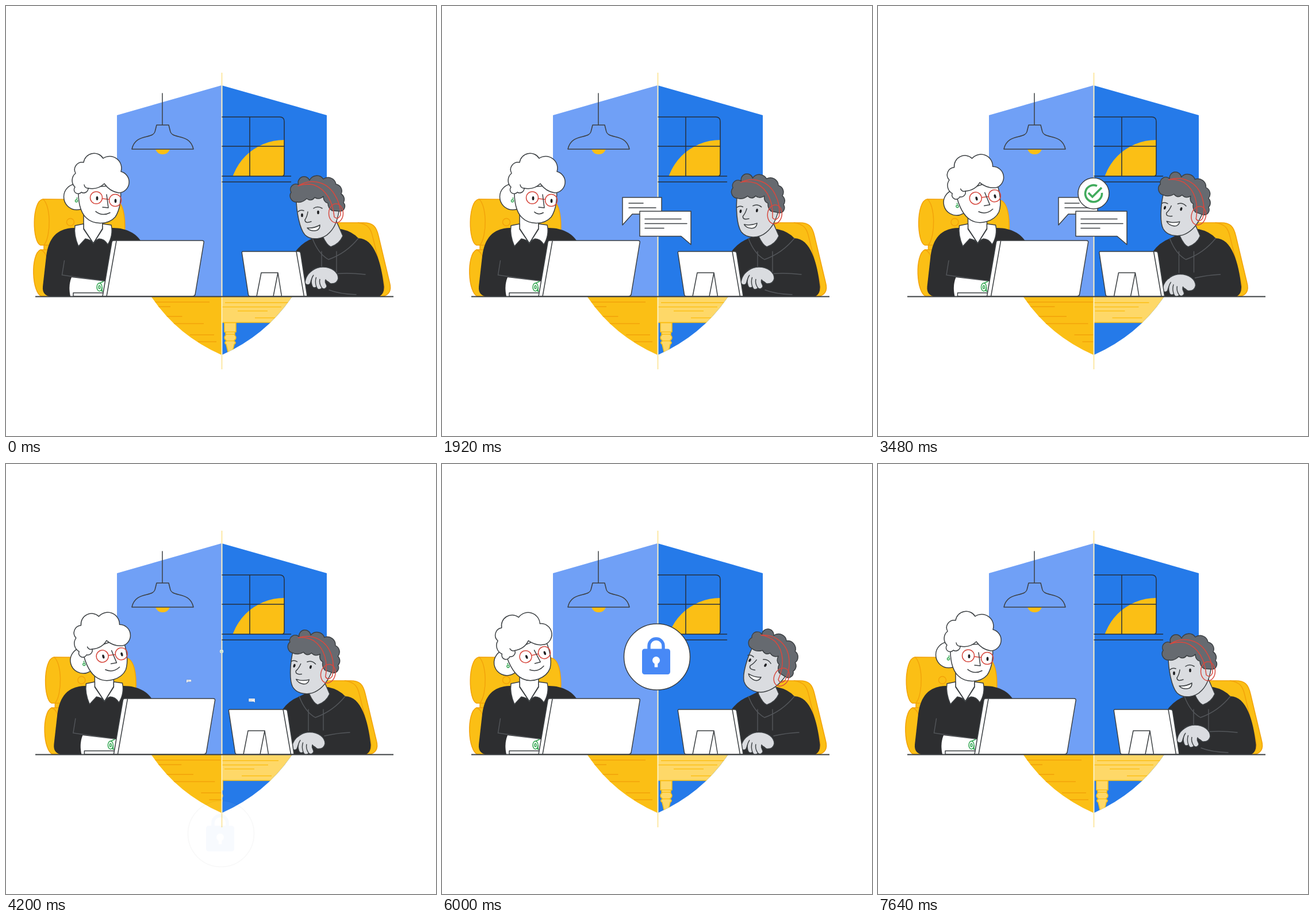
Recreate the animation shown at these times as an HTML page. Size 748 by 748 pixels, loop 7680 ms.

```html
<!DOCTYPE html>
<html lang="en">
<head>
<meta charset="utf-8">
<title>Working together</title>
<style>
html, body { margin: 0; width: 100%; height: 100%; overflow: hidden; background: #fff; }
svg { display: block; width: 100%; height: 100%; }
.ink { stroke: #3c4043; stroke-width: 1.5; stroke-linejoin: round; stroke-linecap: round; fill: none; }
.white { fill: #fff; }
.skin { fill: #dadce0; }
.hair { fill: #666a70; }
.black { fill: #2d2e30; }
.seam { stroke: #54575b; stroke-width: 1.4; fill: none; stroke-linecap: round; }
.amber { fill: #fbbf15; stroke: #f2a20a; stroke-width: 1.5; }
.grain { stroke: #f2a20a; stroke-width: 1.4; fill: none; }
.pale { fill: #fed868; stroke: #fbbf15; stroke-width: 1.5; }
.red { stroke: #d6493f; stroke-width: 1.5; fill: none; stroke-linejoin: round; }
.green { stroke: #34a853; stroke-width: 1.5; fill: none; }
.dot { fill: #202124; }
</style>
</head>
<body>
<svg viewBox="0 0 748 748">
  <defs>
    <clipPath id="leftBase"><path d="M253 506H375V607Q298 573 253 506Z"/></clipPath>
    <clipPath id="rightBase"><path d="M497.500 506H375.500V607Q452 573 497.500 506Z"/></clipPath>
    <clipPath id="pane"><path d="M376 193H476Q484 193 484 201V292Q484 296 480 296H376Z"/></clipPath>
  </defs>

  <!-- shield -->
  <path fill="#70a0f6" d="M193 190L375 138V506H193Z"/>
  <path fill="#257ae9" d="M375 138L558 190V506H375Z"/>
  <g clip-path="url(#leftBase)">
    <path fill="#fbbf15" d="M240 500H380V610H240Z"/>
    <path id="leftGrain" class="grain" d="M200 515H354M200 523H286M200 540H306.500M200 552.500H344M320 572H362M334 584H366"/>
  </g>
  <g clip-path="url(#rightBase)">
    <path fill="#257ae9" d="M370 500H500V610H370Z"/>
    <path fill="#fed868" d="M370 500H500V550.500H370Z"/>
    <path stroke="#fbbf15" stroke-width="1.500" d="M370 550.500H500"/>
    <g id="rightGrain">
      <path fill="none" stroke="#fbbf15" stroke-width="1.500" d="M381 516H497M376 523.500H479M403 530.500H455M433 542.500H485"/>
      <path class="pale" d="M380 551H400V567H380ZM382 567H398V571H382ZM384 571H396Q404 577 396 582.500H384Q376 577 384 571ZM384 582.500H396Q402 585.500 397 588.500L394 601V612H386V601L383 588.500Q378 585.500 384 582.500Z"/>
    </g>
  </g>
  <path stroke="#fbe391" stroke-width="1.600" d="M375.500 116V632"/>
  <path stroke="#fdf3cc" stroke-width="1.600" d="M375.500 138V607"/>

  <!-- lamp and window -->
  <path fill="#fbbf15" d="M260 249H285Q282 258 272.500 258T260 249Z"/>
  <path class="ink" d="M272 152V207M262 207H283L285.500 217C288 233 320 220 326 249H219C225 220 257 233 259.500 217Z"/>
  <circle clip-path="url(#pane)" cx="484" cy="328" r="95" fill="#fbbf15"/>
  <path class="ink" style="stroke:#26313f" d="M376 193H476Q484 193 484 201V291Q484 296 480 296H376M424 193V296M376 244H484M376 296H495.500M376 306H495.500"/>

  <g id="left">
    <path class="amber" d="M66 412H100V428H66Z"/>
    <path class="amber" d="M64 336L188 337C204 338 208 366 206.500 395V416H60C46 412 44 340 64 336Z"/>
    <path class="grain" d="M64 336C78 345 79 400 66 416"/>
    <circle class="grain" cx="112" cy="376" r="6.500"/>
    <path class="amber" d="M60 424H115V505H62C45 500 42 432 60 424Z"/>
    <path class="grain" d="M60 424Q71 428 73 448"/>
    <path class="black" d="M64 488L70 435C74 404 88 387 118 386H186C211 386 227 397 234 408V506H84C69 506 63 500 64 488Z"/>
    <path class="seam" d="M101.500 443L97.500 468L173 479"/>
    <path class="white" d="M175 479.500L114 472C109 484 110 496 112 505H175Z"/>
    <g id="watch" class="green">
      <ellipse cx="162.500" cy="489" rx="4.500" ry="7"/>
      <ellipse cx="162.500" cy="489" rx="1.500" ry="2.800"/>
      <path d="M163 482L170 479M165 495L170 497M167 489V497"/>
    </g>
    <path class="ink white" d="M117 499H176V505H117Z"/>
    <path class="ink white" d="M135 345V387L152 413L168 387V345Z"/>
    <path class="ink white" d="M135 379L120 382C118 396 122 409 126 418L138 405Q147 406 152 413L135 388Z"/>
    <path class="ink white" d="M168 379L183 381C186 393 183 406 177 415Q171 405 162 405Q156 407 152 413L168 388Z"/>
    <g id="womanHead">
      <circle class="ink white" cx="123" cy="332" r="22.500"/>
      <path class="ink white" d="M126 316C125 340 129 358 139 368C152 381 178 381 190 367C198 355 201 335 199 312Z"/>
      <path class="ink white" d="M121 291A13 13 0 0 1 135 272A18.500 18.500 0 0 1 169 265A20.500 20.500 0 0 1 200 288A18.800 18.800 0 0 1 196 325Q181 323 171 309Q160 320 143 317A8 8 0 0 1 131 324A7 7 0 0 1 120 315A16 16 0 0 1 121 291Z"/>
      <path class="ink" d="M143 317Q137 317 136 311"/>
      <circle class="green" cx="122.500" cy="339" r="2"/>
      <path class="green" d="M123.500 333V336"/>
      <ellipse class="dot" cx="158.500" cy="334.500" rx="1.900" ry="3.500"/>
      <ellipse class="dot" cx="190.500" cy="339" rx="1.900" ry="3.500"/>
      <g class="red">
        <circle cx="157" cy="333.500" r="10.500"/><circle cx="190" cy="338" r="10.500"/>
        <path d="M167.500 335L179.500 336.500"/>
      </g>
      <path class="ink" d="M175 328L178 351L168 350"/>
      <path id="smile" class="ink"/>
    </g>
    <path class="ink white" d="M187 408H341Q345 408 344 412L329 502Q328 505 324.500 505H168L184 411Q184.500 408 187 408Z"/>
    <path class="ink" d="M192 409L175 505"/>
  </g>

  <g id="right">
    <path class="amber" d="M570 377H622C638 377 644 383 648 400L667.500 482C671 495 666 503 655 505H590Z"/>
    <path class="grain" d="M612 377C630 379 635 388 638 402L657 480C660 495 656 502 648 505"/>
    <path class="black" d="M503 428Q515 411 534 404L548 397L583 388Q602 392 613 404C641 404 653 447 657.500 488Q658 500 650 505H522Z"/>
    <path class="ink skin" d="M548 388L551 401Q558 416 565 419Q580 414 586 400L572 368Z"/>
    <path class="seam" stroke-width="2" d="M533 404Q543 431 561 441Q592 430 613 404M549 427V464M575 427V463"/>
    <g id="manHead">
      <path class="ink skin" d="M505 335C505 358 511 388 520 398C531 409 552 406 563 394C573 384 578 370 580 350L570 315L510 322Z"/>
      <path class="ink hair" d="M506 341A11 11 0 0 1 496 324A9.500 9.500 0 0 1 509 311A10 10 0 0 1 528 303A14 14 0 0 1 552 301A14 14 0 0 1 574 310A12 12 0 0 1 583 327A11 11 0 0 1 587 342A9 9 0 0 1 582 357L567 356Q560 351 560 343Q552 341 552 331Q545 338 537 333Q531 341 523 335Q515 343 506 341Z"/>
      <ellipse class="red white" cx="574" cy="360.500" rx="12.500" ry="16.500"/>
      <path class="red white" d="M508 313C530 299 557 305 571 327C579 339 582 351 582 363Q578 373 571 367C569 342 558 319 535 311Q520 308 508 313Z"/>
      <g id="face">
        <ellipse class="dot" cx="515" cy="364" rx="1.900" ry="3.200"/>
        <ellipse class="dot" cx="543" cy="359" rx="1.900" ry="3.200"/>
        <path class="ink" d="M508 358Q512 354 518 356M535 352Q542 347 550 352M525 358Q524 366 520 372Q520 379 531 375"/>
        <path class="ink white" d="M524 386Q536 387 546 381Q546 391 536 391Q528 391 524 386Z"/>
      </g>
    </g>
    <path id="forearm" class="seam"/>
    <path id="cuff" class="seam" d="M562 494Q580 501 609 502"/>
    <g id="hand"></g>
    <path class="ink white" d="M412 427H509Q512 427 512.500 430L524 505H425Q422 505 421.500 502L410.500 430Q410 427 412 427Z"/>
    <path class="ink" d="M505 427L518.500 505M436 505L444 464H473L479.500 505M473 464L465 505"/>
  </g>

  <path stroke="#3c4043" stroke-width="1.800" d="M51 505.500H674"/>

  <g id="reply">
    <path class="ink white" d="M314 333H382V362H331L314 381Z"/>
    <path class="ink" d="M325 343H350M325 351H372"/>
  </g>
  <g id="message">
    <path class="ink white" d="M344 357H433V415L416 400.500H344Z"/>
    <path class="ink" d="M353 370.500H416M353 378.500H426M353 386.500H386"/>
  </g>
  <g id="check">
    <circle class="ink white" cx="375" cy="326" r="27"/>
    <path fill="none" stroke="#41ab5d" stroke-width="3.600" d="M389.500 325A14.500 14.500 0 1 1 381 313M366 325L373 332L389 316"/>
  </g>
  <g id="lock">
    <circle class="ink white" r="57.500"/>
    <path fill="none" stroke="#4889f6" stroke-width="5.500" d="M-14 -12V-19A12.500 12.500 0 0 1 11 -19V-12"/>
    <rect x="-26" y="-14" width="49" height="44.500" rx="4.500" fill="#4889f6"/>
    <circle class="white" cx="-1.500" cy="6" r="6.500"/>
    <path class="white" d="M-4.300 8H1.300V18H-4.300Z"/>
  </g>
</svg>
<script>
const LOOP = 7680;
const $ = id => document.getElementById(id);
const set = (id, name, value) => $(id).setAttribute(name, value);
const smooth = p => p * p * (3 - 2 * p);
const clamp = v => Math.max(0, Math.min(1, v));

// Each track is a list of [time, value], eased between neighbours.
const tracks = {
  slide: [[1940, 0], [2720, 1], [4080, 1], [4700, 0]],
  woman: [[500, 0], [900, -15], [1350, -15], [1750, 0], [2150, 0], [2650, -15], [4500, -15], [5250, -20], [6400, -20], [7100, 0]],
  man: [[450, 0], [900, 15], [1250, 15], [1700, 7.3], [2100, 7.3], [2700, 14.5], [4300, 14.5], [5250, 28], [6400, 28], [7100, 0]],
  smile: [[1350, 1], [1750, .62], [2150, .62], [2600, 1]],
  point: [[650, 0], [920, 1], [1150, 1], [1420, 0]],
  drop: [[2150, 0], [2600, 1], [6500, 1], [7000, 0]],
  message: [[820, 0], [980, 1], [4060, 1], [4240, 0]],
  reply: [[1560, 0], [1740, 1], [4060, 1], [4240, 0]],
  check: [[2880, 0], [3100, 1], [4060, 1], [4240, 0]],
  lockFade: [[4190, 0], [4290, 1]],
  lockSize: [[6480, 1], [6720, 0]]
};

function at(name, t) {
  const keys = tracks[name];
  if (t <= keys[0][0]) return keys[0][1];
  for (let i = 1; i < keys.length; i++) {
    const [t0, a] = keys[i - 1], [t1, b] = keys[i];
    if (t < t1) return a + (b - a) * smooth((t - t0) / (t1 - t0));
  }
  return keys[keys.length - 1][1];
}

function scaleFrom(id, x, y, s) {
  set(id, 'transform', `translate(${x} ${y}) scale(${s}) translate(${-x} ${-y})`);
  set(id, 'visibility', s > .01 ? 'visible' : 'hidden');
}

// A finger is a thick line laid over a slightly thicker dark one.
const finger = d => `<path d="${d}" fill="none" stroke="#3c4043" stroke-width="11" stroke-linecap="round"/>
  <path d="${d}" fill="none" stroke="#dadce0" stroke-width="8.200" stroke-linecap="round"/>`;

function drawHand(point, drop) {
  const dx = 4 * point, dy = -15 * point + 12.5 * drop;
  const tipX = 525 - 14 * point, tipY = 480 - 23 * point;
  const palm = 'M533 461Q542 454 551 454C567 454 578 463 578 474Q576 484 565 483Q557 474 546 475L536 470Z';
  $('hand').innerHTML =
    finger(`M541 462Q528 ${466 - 2 * point} ${tipX} ${tipY}`) +
    finger('M545 465Q533 474 537 485') +
    finger('M549 465Q540 476 545 488') +
    finger('M558 465Q546 476 553 487') +
    `<path class="skin" d="${palm}"/>
     <path class="ink" d="M533 459Q542 454 551 454C567 454 578 463 578 474Q576 484 565 483Q558 481 556 476"/>`;
  set('hand', 'transform', `translate(${dx} ${dy})`);
  set('forearm', 'd', `M${577 + dx} ${465.5 + dy * .6}Q600 ${464 + dy * .3} ${625 + 5 * point - 4 * drop} 467`);
  set('cuff', 'transform', `translate(0 ${-8 * point})`);
  set('cuff', 'opacity', 1 - drop);
}

function draw(t) {
  const slide = at('slide', t);
  for (const id of ['left', 'leftGrain']) set(id, 'transform', `translate(${21.5 * slide} 0)`);
  for (const id of ['right', 'rightGrain']) set(id, 'transform', `translate(${-25.5 * slide} 0)`);

  const man = at('man', t), point = at('point', t);
  set('womanHead', 'transform', `rotate(${at('woman', t)} 156 367)`);
  set('manHead', 'transform', `rotate(${man} 562 399)`);
  // The face leads the head a little as he looks up.
  set('face', 'transform', `rotate(${-man} 562 399) translate(${-.05 * man} ${-.17 * man}) rotate(${man} 562 399)`);

  const w = 12.5 * at('smile', t);
  set('smile', 'd', `M${168.5 - w} ${359.5 - w / 6}Q${168 - w * .05} ${361 + w * .45} ${168.5 + w} ${359.5}`);
  set('watch', 'transform', `translate(${-point} ${-2 * point})`);
  drawHand(point, at('drop', t));

  scaleFrom('message', 433, 415, at('message', t));
  scaleFrom('reply', 314, 381, at('reply', t));
  scaleFrom('check', 375, 326, at('check', t));

  const rise = Math.pow(1 - clamp((t - 4190) / 740), 3);
  const size = at('lockSize', t), fade = at('lockFade', t);
  set('lock', 'transform', `translate(374 ${335.5 + 322 * rise}) scale(${size})`);
  set('lock', 'opacity', fade);
  set('lock', 'visibility', size * fade > .01 ? 'visible' : 'hidden');
}

function tick() {
  draw(performance.now() % LOOP);
  requestAnimationFrame(tick);
}
tick();
</script>
</body>
</html>
```
